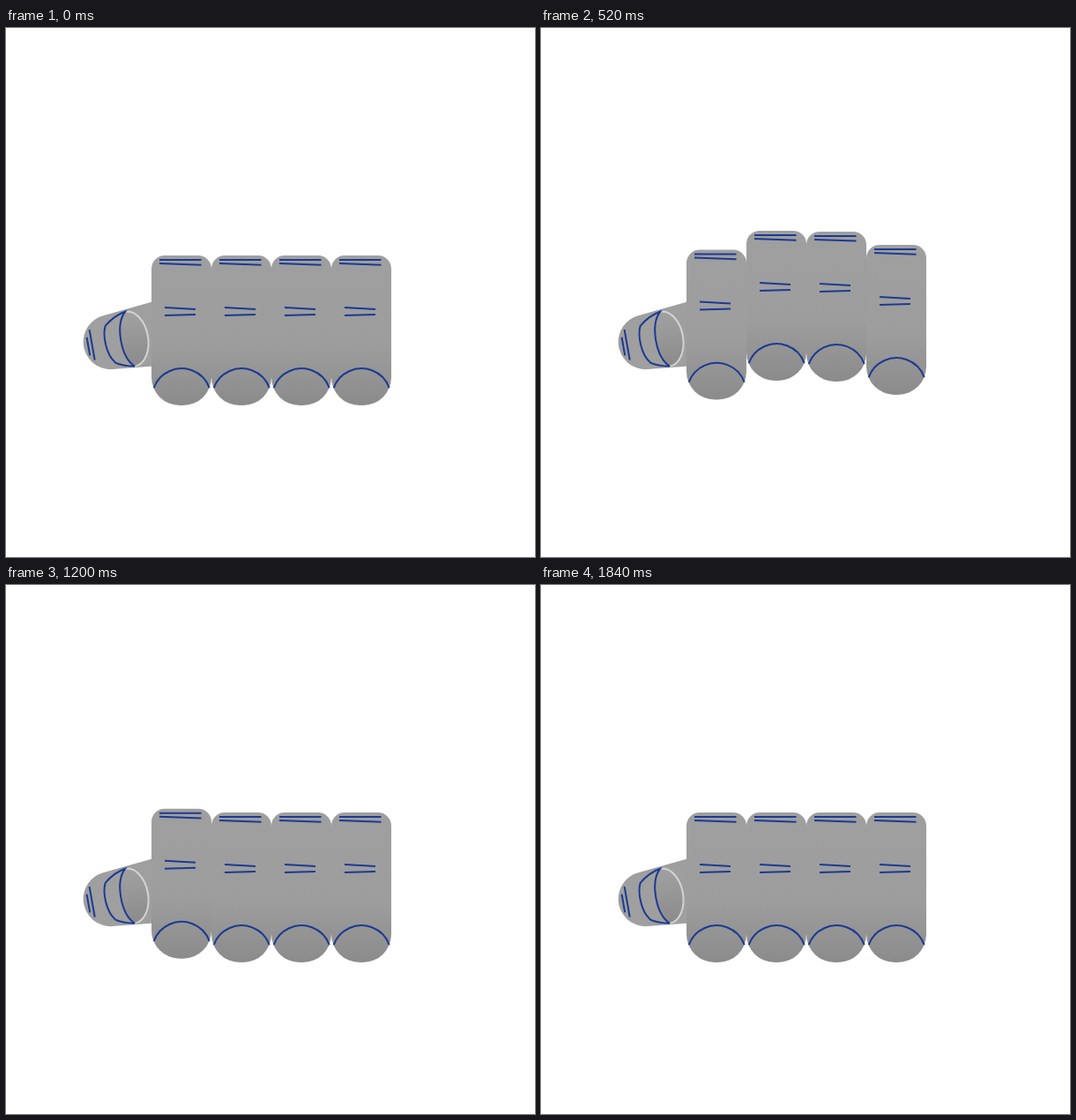
Animation of 600 by 600 pixels, one loop 2440 ms. Source, as an HTML page with a canvas:

```html
<!DOCTYPE html>
<html lang="en">
<head>
<meta charset="utf-8">
<title>Tapping fingers</title>
<style>
  html, body { margin: 0; width: 100%; height: 100%; overflow: hidden; background: #fff; }
  canvas { display: block; width: 600px; height: 600px; }
</style>
</head>
<body>
<canvas id="stage"></canvas>
<script>
const LOOP = 2440, STEP = 40;
const BLUE = '#1b3a92', SKIN = '#9f9f9f', SHADE = '#8b8b8b', RIM = '#d3d3d3';

const canvas = document.getElementById('stage');
const ctx = canvas.getContext('2d');
const dpr = window.devicePixelRatio || 1;
canvas.width = canvas.height = 600 * dpr;

// Each tap: start, top reached, top left, end (ms), height.
const TAPS = [
  [[58, 298, 357, 597, 30], [1152, 1302, 1333, 1483, 20], [1506, 1656, 1695, 1840, 20]],
  [[178, 418, 477, 717, 30]],
  [[332, 572, 609, 849, 30]],
  [[414, 654, 681, 920, 30]]
];
const THUMB = [110, 320, 362, 518, 1];

// Same curve as CSS ease-in-out.
function ease(x) {
  if (x <= 0) return 0;
  if (x >= 1) return 1;
  let lo = 0, hi = 1, s = 0.5;
  for (let i = 0; i < 24; i++) {
    const r = 1 - s;
    if (1.26 * s * r * r + 1.74 * s * s * r + s * s * s < x) lo = s; else hi = s;
    s = (lo + hi) / 2;
  }
  return s * s * (3 - 2 * s);
}

function lift(t, [start, up, leave, end, height]) {
  return height * (ease((t - start) / (up - start)) - ease((t - leave) / (end - leave)));
}

function shade(y0, y1, flat) {
  const g = ctx.createLinearGradient(0, y0, 0, y1);
  g.addColorStop(0, SKIN);
  g.addColorStop(flat, '#9d9d9d');
  g.addColorStop(1, SHADE);
  return g;
}

function line(x0, y0, x1, y1) {
  ctx.beginPath();
  ctx.moveTo(x0, y0);
  ctx.lineTo(x1, y1);
  ctx.stroke();
}

function finger(x, y) {
  ctx.save();
  ctx.translate(x, y);
  ctx.fillStyle = shade(0, 170, 0.6);
  ctx.beginPath();
  ctx.roundRect(0, 0, 68, 170, [15, 15, 32, 32]);
  ctx.fill();
  ctx.strokeStyle = BLUE;
  line(9, 5, 56.5, 5);
  line(9, 9, 56.5, 10.7);
  line(15, 59, 50, 61);
  line(15, 68, 50, 67);
  ctx.beginPath();
  ctx.arc(34.2, 161.8, 33.6, Math.PI + 0.355, -0.355);
  ctx.stroke();
  ctx.restore();
}

function thumb(raise) {
  ctx.save();
  ctx.translate(308, 340);
  ctx.rotate((raise - 1) * Math.PI / 18);
  ctx.translate(-308, -340);

  ctx.fillStyle = SKIN;
  ctx.beginPath();
  ctx.arc(118.7, 323, 31, 1.67, -1.67);
  ctx.lineTo(176, 286);
  ctx.lineTo(176, 360);
  ctx.closePath();
  ctx.fill();

  const inner = () => ctx.bezierCurveTo(127, 342, 127, 305, 141, 292);
  ctx.fillStyle = shade(292, 355, 0.2);
  ctx.beginPath();
  ctx.ellipse(141, 323.5, 20.5, 31.5, 0, -Math.PI / 2, Math.PI / 2);
  inner();
  ctx.fill();

  ctx.strokeStyle = RIM;
  ctx.beginPath();
  ctx.ellipse(141, 323.5, 20.5, 31.5, 0, -Math.PI / 2, Math.PI / 2);
  ctx.stroke();

  ctx.strokeStyle = BLUE;
  ctx.beginPath();
  ctx.moveTo(141, 355);
  inner();
  ctx.quadraticCurveTo(128, 294, 116, 304);
  ctx.bezierCurveTo(111, 314, 111, 336, 120, 347);
  ctx.quadraticCurveTo(127, 352, 141, 355);
  ctx.stroke();
  line(93, 313, 93, 334);
  line(97.5, 305, 97.5, 340);
  ctx.restore();
}

function draw(t) {
  ctx.setTransform(dpr, 0, 0, dpr, 0, 0);
  ctx.fillStyle = '#fff';
  ctx.fillRect(0, 0, 600, 600);
  ctx.lineWidth = 2;
  thumb(lift(t, THUMB));
  TAPS.forEach((taps, i) => {
    const up = taps.reduce((sum, tap) => sum + lift(t, tap), 0);
    finger(165 + 68 * i, 258 - up);
  });
}

const begin = performance.now();
function tick() {
  const t = (performance.now() - begin) % LOOP;
  draw(Math.floor(t / STEP) * STEP);
  requestAnimationFrame(tick);
}
tick();
</script>
</body>
</html>
```
